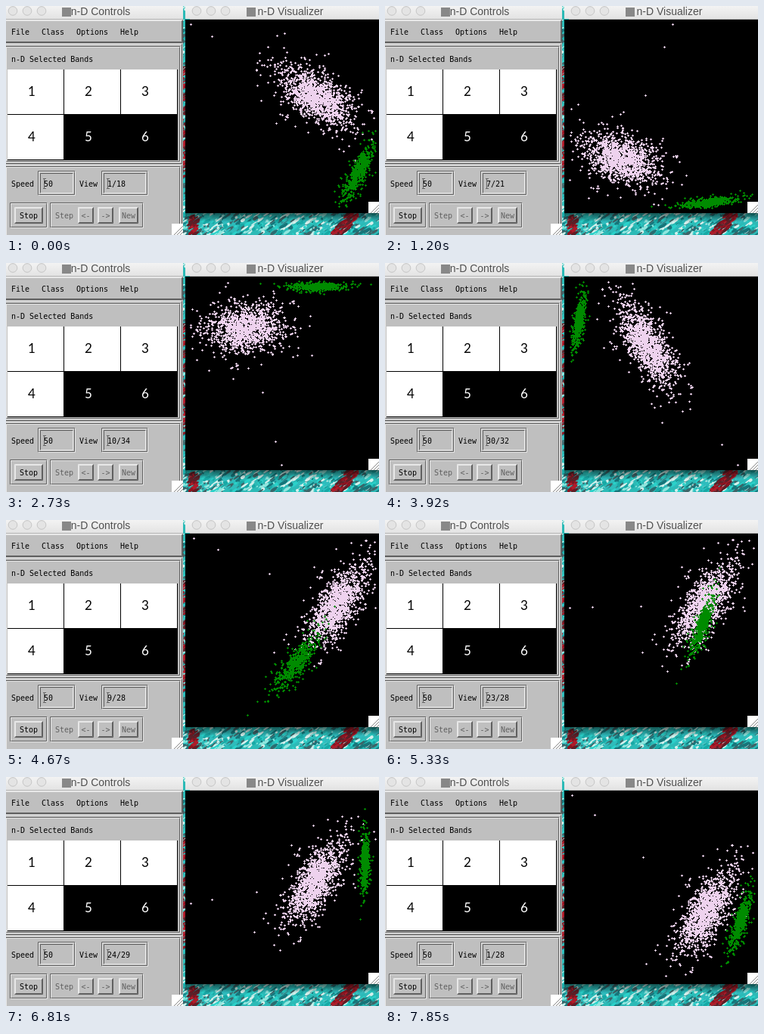
These frames come from a looping animation (493x303 px, 8 s). An HTML page with a canvas:

```html
<!DOCTYPE html>
<html lang="en">
<head>
<meta charset="utf-8">
<title>n-D Visualizer</title>
<style>
html, body { margin: 0; width: 493px; height: 303px; overflow: hidden; background: #bfbfbf; }
canvas, svg { position: absolute; left: 0; top: 0; }
text { font: 10px 'DejaVu Sans Mono', monospace; white-space: pre; }
.title { font: 14px 'Liberation Sans', sans-serif; fill: #505050; }
.digit { font: 17px Lato, sans-serif; text-anchor: middle; }
.off { fill: #606060; }
</style>
</head>
<body>
<canvas id="stage" width="493" height="303"></canvas>
<svg id="ui" width="493" height="303"></svg>
<script>
const LOOP = 8000, STEPS = 52;
const ctx = document.getElementById('stage').getContext('2d');

let seed = 7;
function rand() {
  seed = (seed * 16807) % 2147483647;
  return seed / 2147483647;
}
function gauss() {
  return Math.sqrt(-2 * Math.log(rand())) * Math.cos(2 * Math.PI * rand());
}

// ---- Controls and window frames ----
const rect = (x, y, w, h, fill) =>
  `<rect x="${x}" y="${y}" width="${w}" height="${h}" fill="${fill}"/>`;
const text = (x, y, s, attr = '') => `<text x="${x}" y="${y}" ${attr}>${s}</text>`;
const line = (d, color) => `<path d="${d}" fill="none" stroke="${color}"/>`;

function bevel(x, y, w, h, raised) {
  const [a, b] = raised ? ['#e8e8e8', '#606060'] : ['#606060', '#e8e8e8'];
  return line(`M${x + .5} ${y + h - .5}V${y + .5}H${x + w - .5}`, a) +
    line(`M${x + .5} ${y + h - .5}H${x + w - .5}V${y + .5}`, b);
}
const groove = (x, y, w, h) => bevel(x, y, w, h, false) + bevel(x + 1, y + 1, w - 2, h - 2, true);

function titleBar(x, w, title) {
  let s = rect(x, 0, w, 18, 'url(#bar)') + line(`M${x} 17.5H${x + w}`, '#b4b4b4');
  for (let i = 0; i < 3; i++)
    s += `<circle cx="${x + 9 + 19 * i}" cy="6.5" r="5.8" fill="#e4e4e4" stroke="#c4c4c4"/>`;
  const mid = x + w / 2;
  return s + text(mid + 8, 12, title, 'class="title" text-anchor="middle"') +
    rect(Math.round(mid - title.length * 3.6), 2, 12, 12, '#888');
}
function grip(x, y) {
  let s = rect(x, y, 15, 15, '#fff');
  for (const k of [3, 7, 11]) s += line(`M${x + k} ${y + 15}L${x + 15} ${y + k}`, '#888');
  return s;
}
function field(x, w, id, s) {
  const tx = x + 8;
  return groove(x, 218, w, 33) + bevel(x + 3, 221, w - 6, 27, false) +
    text(tx, 239, s, `id="${id}"`) +
    line(`M${tx + .5} 229V241M${tx - 1} 228.5h4M${tx - 1} 241.5h4`, '#666');
}
const button = (x, w, s, cls = '') =>
  bevel(x, 266, w, 22, true) + bevel(x + 1, 267, w - 2, 20, true) +
  text(x + w / 2, 281, s, `class="${cls}" text-anchor="middle"`);

function cells() {
  let s = rect(2, 84, 225, 120, '#000');
  for (let i = 0; i < 6; i++) {
    const x = 2 + i % 3 * 75, y = 84 + (i / 3 | 0) * 60, on = i < 4;
    if (on) s += rect(x, y, 74, 59, '#fff');
    s += text(x + 32, y + 35, i + 1, `class="digit" fill="${on ? '#000' : '#fff'}"`);
  }
  return s;
}

document.getElementById('ui').innerHTML =
  `<defs><linearGradient id="bar" x2="0" y2="1"><stop stop-color="#f3f3f3"/>
   <stop offset="1" stop-color="#e2e2e2"/></linearGradient></defs>` +
  rect(0, 18, 234, 285, '#bfbfbf') +
  titleBar(0, 234, 'n-D Controls') + titleBar(243, 250, 'n-D Visualizer') +
  rect(237, 0, 6, 17, 'url(#bar)') +
  bevel(-1, 18, 235, 31, true) + bevel(-1, 19, 234, 29, true) +
  text(7, 38, 'File') + text(47, 38, 'Class') + text(93, 38, 'Options') + text(151, 38, 'Help') +
  bevel(-1, 50, 234, 159, true) + groove(-1, 53, 232, 154) +
  text(7, 74, 'n-D Selected Bands') + cells() +
  bevel(-1, 210, 234, 95, true) + groove(-1, 212, 232, 95) +
  text(7, 239, 'Speed') + field(42, 50, 'speed', '50') +
  text(97, 239, 'View') + field(126, 62, 'view', '') +
  groove(5, 260, 50, 34) + button(11, 38, 'Stop') +
  groove(58, 260, 124, 34) + text(65, 281, 'Step', 'class="off"') +
  button(95, 21, '&lt;-', 'off') + button(121, 21, '-&gt;', 'off') + button(149, 26, 'New', 'off') +
  grip(219, 288) + grip(479, 259);

// ---- Terrain behind the windows ----
function speckle(n, x, y, w, h, colors, slant = 0) {
  for (let i = 0; i < n; i++) {
    const v = rand();
    ctx.fillStyle = colors[rand() * colors.length | 0];
    ctx.beginPath();
    ctx.ellipse(x + rand() * w + v * slant, y + v * h, 1 + rand() * 5, .7 + rand() * 1.5, -.6, 0, 7);
    ctx.fill();
  }
}
const teals = ['#18a9a6', '#2ad2ca', '#8fe6de', '#17757a', '#2fbcbe', '#d4f0ec', '#3f6468'];
const reds = ['#8d1420', '#b01c2a', '#5c2028'];
ctx.fillStyle = '#2cbab6';
ctx.fillRect(234, 0, 259, 303);
speckle(650, 234, 272, 259, 31, teals);
speckle(150, 232, 0, 6, 303, teals);
speckle(70, 232, 80, 6, 150, reds);
speckle(40, 242, 278, 10, 25, reds);
speckle(90, 450, 274, 18, 30, reds, -22);
const shade = ctx.createLinearGradient(0, 273, 0, 286);
shade.addColorStop(0, 'rgba(0,0,0,.6)');
shade.addColorStop(1, 'rgba(0,0,0,0)');
ctx.fillStyle = shade;
ctx.fillRect(237, 274, 256, 12);

// ---- Point clouds ----
const LEFT = 244, TOP = 24, RIGHT = 488, BOTTOM = 267;
const cloud = n => Array.from({ length: n }, () => {
  const k = rand() < .2 ? 1.5 : .9;
  return [gauss() * k, gauss() * k];
});
const pink = cloud(1350), green = cloud(560);

// step, view, views, pink x, y, tilt, green x, y, tilt, direction of the stray points
const poses = [
  [0, 1, 18, 410, 120, 35, 465, 221, -63, 210],
  [8, 7, 21, 312, 202, 20, 427, 260, -7, 291],
  [18, 10, 34, 316, 86, -5, 410, 31, 0, 435],
  [26, 30, 32, 346, 108, 60, 256, 78, -80, 413],
  [31, 9, 28, 437, 112, 123, 383, 190, -52, 565],
  [39, 19, 29, 397, 110, 122, 478, 58, -100, 494],
  [51, 1, 28, 424, 178, 120, 469, 193, -72, 581]
];

function plus(x, y) {
  x = Math.round(x);
  y = Math.round(y);
  if (x < LEFT || x > RIGHT || y < TOP || y > BOTTOM) return;
  ctx.fillRect(x - 1, y, 3, 1);
  ctx.fillRect(x, y - 1, 1, 3);
}
function drawCloud(points, cx, cy, angle, long, short) {
  const c = Math.cos(angle), s = Math.sin(angle);
  for (const [u, v] of points)
    plus(cx + u * long * c - v * short * s, cy + u * long * s + v * short * c);
}
// the farthest stray point always lies on the edge of the plot
function drawStrays(cx, cy, angle) {
  const c = Math.cos(angle), s = Math.sin(angle);
  const reach = Math.min(((c > 0 ? RIGHT : LEFT) - cx) / c, ((s > 0 ? BOTTOM : TOP) - cy) / s);
  for (const k of [.999, .83, .47]) plus(cx + c * reach * k, cy + s * reach * k);
}

const view = document.getElementById('view');
const rad = deg => deg * Math.PI / 180;
function draw(step) {
  const i = Math.max(1, poses.findIndex(k => k[0] >= step));
  const from = poses[i - 1], to = poses[i];
  const p = (step - from[0]) / (to[0] - from[0]);
  const [px, py, pTilt, gx, gy, gTilt, stray] = from.map((v, j) => v + (to[j] - v) * p).slice(3);

  // the counter runs out one set of views, then starts the next
  const n = Math.round(from[1] + p * (from[2] - from[1] + to[1]));
  view.textContent = n <= from[2] ? `${n}/${from[2]}` : `${n - from[2]}/${to[2]}`;

  ctx.fillStyle = '#000';
  ctx.fillRect(237, 18, 256, 256);

  const steep = Math.sin(rad(pTilt)) ** 2, diagonal = Math.sin(rad(2 * gTilt)) ** 2;
  ctx.fillStyle = '#eed2ee';
  drawCloud(pink, px, py, rad(pTilt), 25 + 6 * steep, 15.5 - 4.5 * steep);
  drawStrays(px, py, rad(stray));
  ctx.fillStyle = '#008b00';
  drawCloud(green, gx, gy, rad(gTilt), 18 + 5 * diagonal, 2.7 + 4 * diagonal);
}

// an even beat with one short and one long hold
const startOf = n => 150 * n + (n > 10 ? 20 : 0) + (n > 31 ? 180 : 0);

let shown = -1;
function frame() {
  const t = performance.now() % LOOP;
  let step = STEPS - 1;
  while (startOf(step) > t) step--;
  if (step !== shown) draw(shown = step);
  requestAnimationFrame(frame);
}
frame();
</script>
</body>
</html>
```
